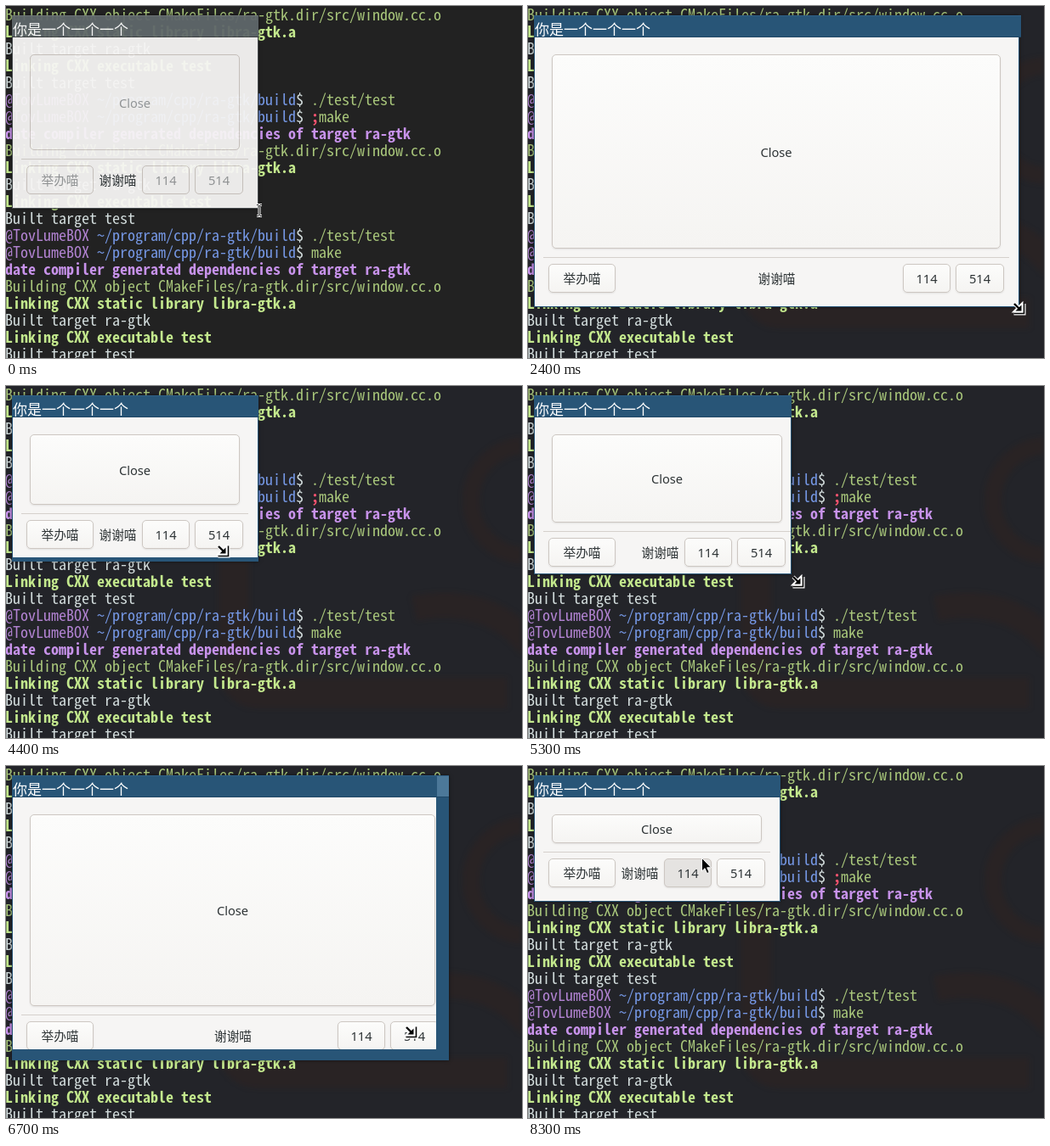
An HTML page that plays this animation: 607 px wide and 415 px high, repeating every 8400 ms.

```html
<!DOCTYPE html>
<html lang="zh">
<head>
<meta charset="utf-8">
<title>Window resize</title>
<style>
html, body { margin: 0; width: 607px; height: 415px; overflow: hidden; background: #222; }
#stage { position: relative; width: 607px; height: 415px; overflow: hidden; }
#stage div, #stage svg { position: absolute; box-sizing: border-box; }
#wall { inset: 0; background: #232429; }
#wall svg { inset: 0; filter: blur(3px); }
#term {
  position: absolute; left: -1px; top: -1px; margin: 0; color: #d3dddd;
  font: 18px/20px "Noto Sans Mono CJK SC", monospace; font-variant-ligatures: none;
}
#term span { display: block; height: 20px; white-space: pre; }
#term i { font-style: normal; }
i.g { color: #a9c77b; }
i.p { color: #b283d2; }
i.u { color: #7597e4; }
b.g { color: #c3e88d; }
b.p { color: #c792ea; }
b.r { color: #ff5370; }

#win {
  --on: 100%;
  --bar: color-mix(in srgb, #285577 var(--on), #5f676a);
  left: 7px; top: 11px;
  font: 14.67px/20px "Noto Sans", "Noto Sans CJK SC", sans-serif;
  color: color-mix(in srgb, #2e3436 var(--on), #96999a);
}
#frame {
  left: 0; top: 0; box-shadow: 0 0 4px rgba(0, 0, 0, .55);
  background: color-mix(in srgb, #285577 var(--on), #484e50);
}
#bar {
  left: 0; top: 0; height: 26px; background: var(--bar); overflow: hidden;
  border-top: 1px solid color-mix(in srgb, #2f6088 var(--on), #70777a);
  border-bottom: 1px solid color-mix(in srgb, #1f4766 var(--on), #3c4042);
}
#trail { top: 0; right: 0; height: 24px; background: #4c7899; }
#bar p {
  position: absolute; margin: 0; left: 1px; top: 0; white-space: nowrap; color: #fff;
  font: 17px/30px "Noto Sans CJK SC", sans-serif;
}
#view { left: 1px; top: 26px; overflow: hidden; background: #f6f5f4; }
#pane { left: 0; top: 0; }
.btn {
  display: flex; align-items: center; justify-content: center; white-space: nowrap;
  border: 1px solid #cdc7c2; border-radius: 5px; height: 34px; bottom: 16px;
  background: linear-gradient(#fcfcfb, #f5f4f2);
  box-shadow: 0 1px 2px rgba(0, 0, 0, .09);
}
.idle .btn { background: #f6f5f4; box-shadow: none; }
#close { left: 20px; right: 21px; top: 20px; bottom: 68px; height: auto; }
#act { left: 16px; width: 79px; }
#one { right: 80px; width: 56px; }
#two { right: 17px; width: 57px; }
#one.hover { background: #e5e3e1; }
#rule { left: 10px; right: 11px; bottom: 57px; height: 1px; background: #d5d0cc; }
#label {
  left: min(50%, calc(100% - 164.5px)); bottom: 23px; transform: translateX(-50%);
  color: #2e3436; white-space: nowrap;
}
.cur { left: 0; top: 0; overflow: visible; }
</style>
</head>
<body>
<div id="stage">
  <div id="wall">
    <svg width="607" height="415" fill="none" stroke="#4a2412" stroke-opacity=".16">
      <circle cx="612" cy="135" r="65" stroke-width="20"/>
      <path d="M480 262 Q570 245 620 310" stroke-width="30"/>
      <path d="M268 40 V330 Q268 362 300 362 H590" stroke-width="36"/>
    </svg>
  </div>
  <pre id="term"></pre>
  <div id="win">
    <div id="frame"></div>
    <div id="bar"><div id="trail"></div><p>你是一个一个一个</p></div>
    <div id="view"><div id="pane">
      <div class="btn" id="close">Close</div>
      <div id="rule"></div>
      <div class="btn" id="act">举办喵</div>
      <div id="label">谢谢喵</div>
      <div class="btn" id="one">114</div>
      <div class="btn" id="two">514</div>
    </div></div>
  </div>
  <svg class="cur" id="beam" width="8" height="16" fill="none">
    <path id="stem" d="M1 1.5 H3 L4 2.5 L5 1.5 H7 M4 2.5 V13.5 M1 14.5 H3 L4 13.5 L5 14.5 H7" stroke="#fff" stroke-width="3"/>
    <path d="M1 1.5 H3 L4 2.5 L5 1.5 H7 M4 2.5 V13.5 M1 14.5 H3 L4 13.5 L5 14.5 H7" stroke="#000"/>
  </svg>
  <svg class="cur" id="size" width="16" height="16">
    <path d="M13.5 2 V13.5 H1.5" fill="none" stroke="#fff" stroke-width="4"/>
    <path d="M2 2 L8 8 M10.5 3.5 V10.5 H3.5 Z" fill="#fff" stroke="#fff" stroke-width="4"/>
    <path d="M13.5 1.5 V13.5 H1.5" fill="none" stroke="#000" stroke-width="1.6"/>
    <path d="M2 2 L8 8" stroke="#000" stroke-width="2.4"/>
    <path d="M10.5 3.5 V10.5 H3.5 Z"/>
  </svg>
  <svg class="cur" id="arrow" width="13" height="20">
    <path d="M.5 .5 V16 L4 12.7 L6.6 18.6 L9.2 17.4 L6.7 11.8 H11.5 Z" stroke="#fff"/>
  </svg>
</div>
<script>
const $ = id => document.getElementById(id);
const tag = (el, cls, text) => `<${el} class="${cls}">${text}</${el}>`;

// Terminal log
const prompt = cmd => tag("i", "p", "@TovLumeBOX") + " " +
  tag("i", "u", "~/program/cpp/ra-gtk/build") + "$ " + cmd;
const run = prompt(tag("i", "g", "./test/test"));
const date = tag("b", "p", "date compiler generated dependencies of target ra-gtk");
const build = [
  tag("i", "g", "Building CXX object CMakeFiles/ra-gtk.dir/src/window.cc.o"),
  tag("b", "g", "Linking CXX static library libra-gtk.a"),
  "Built target ra-gtk",
  tag("b", "g", "Linking CXX executable test"),
  "Built target test"
];
const log = [
  ...build, run, prompt(tag("b", "r", ";") + tag("i", "g", "make")), date,
  ...build, run, prompt(tag("i", "g", "make")), date,
  ...build
];
$("term").innerHTML = log.map(line => tag("span", "", line)).join("");

// Pointer path: time, x, y
const path = [
  [800, 281, 229], [1400, 401, 294], [1700, 483, 309], [2400, 570, 349],
  [2600, 570, 349], [2900, 582, 384], [3400, 583, 391],
  [4400, 248, 187], [4900, 243, 177], [5100, 243, 177],
  [5800, 479, 338], [6400, 571, 388], [6600, 541, 368], [6700, 469, 306],
  [6900, 265, 170], [7300, 211, 141], [8300, 204, 108]
];

function pointer(t) {
  const i = path.findIndex(p => p[0] > t);
  const [t0, x0, y0] = path[Math.max(i - 1, 0)];
  const [t1, x1, y1] = path[i];
  const k = Math.max(0, (t - t0) / (t1 - t0 || 1));
  return [x0 + (x1 - x0) * k, y0 + (y1 - y0) * k];
}

// Bottom right window corner: follows the pointer with a delay, down to the smallest size
const LAG = 50;
function corner(t) {
  const [x, y] = pointer(t - LAG);
  return [Math.max(297, Math.round(x + 16)), Math.max(160, Math.round(y + 10))];
}

function box(id, w, h) {
  $(id).style.width = w + "px";
  if (h !== undefined) $(id).style.height = h + "px";
}

function draw(t) {
  const outer = corner(t), next = corner(t + 20);
  const shrinking = next[0] < outer[0] || next[1] < outer[1];
  // The layout runs behind or ahead of the frame, depending on the drag
  const inner = corner(t + (shrinking ? -8 : t < 4000 ? -12 : 35));
  const clip = shrinking ? next : outer.map((v, n) => Math.min(v, inner[n]));
  const shell = shrinking ? outer : clip;

  box("frame", shell[0] - 7, shell[1] - 11);
  box("bar", outer[0] - 7);
  box("trail", outer[0] - clip[0]);
  $("trail").hidden = !shrinking;
  box("view", clip[0] - 9, clip[1] - 38);
  box("pane", inner[0] - 9, inner[1] - 38);

  const focus = Math.min(t / 200, 1), win = $("win");
  win.style.setProperty("--on", focus * 100 + "%");
  win.style.opacity = 0.95 + 0.05 * focus;
  win.classList.toggle("idle", t < 100);
  $("wall").style.opacity = focus;
  $("one").classList.toggle("hover", t >= 7600);

  const shape = t < 200 ? "beam" : t < 7500 ? "size" : "arrow";
  const [x, y] = shape === "beam" ? [294, 233] : pointer(t).map(Math.round);
  for (const id of ["beam", "size", "arrow"]) {
    $(id).style.display = id === shape ? "block" : "none";
  }
  $(shape).style.transform = `translate(${x}px, ${y}px)`;
}

const start = performance.now();
function tick() {
  const t = (performance.now() - start) % 8400;
  // The screen refreshes ten times a second
  draw(Math.min(Math.floor(t / 100) * 100, 8299));
  requestAnimationFrame(tick);
}
tick();
</script>
</body>
</html>
```
